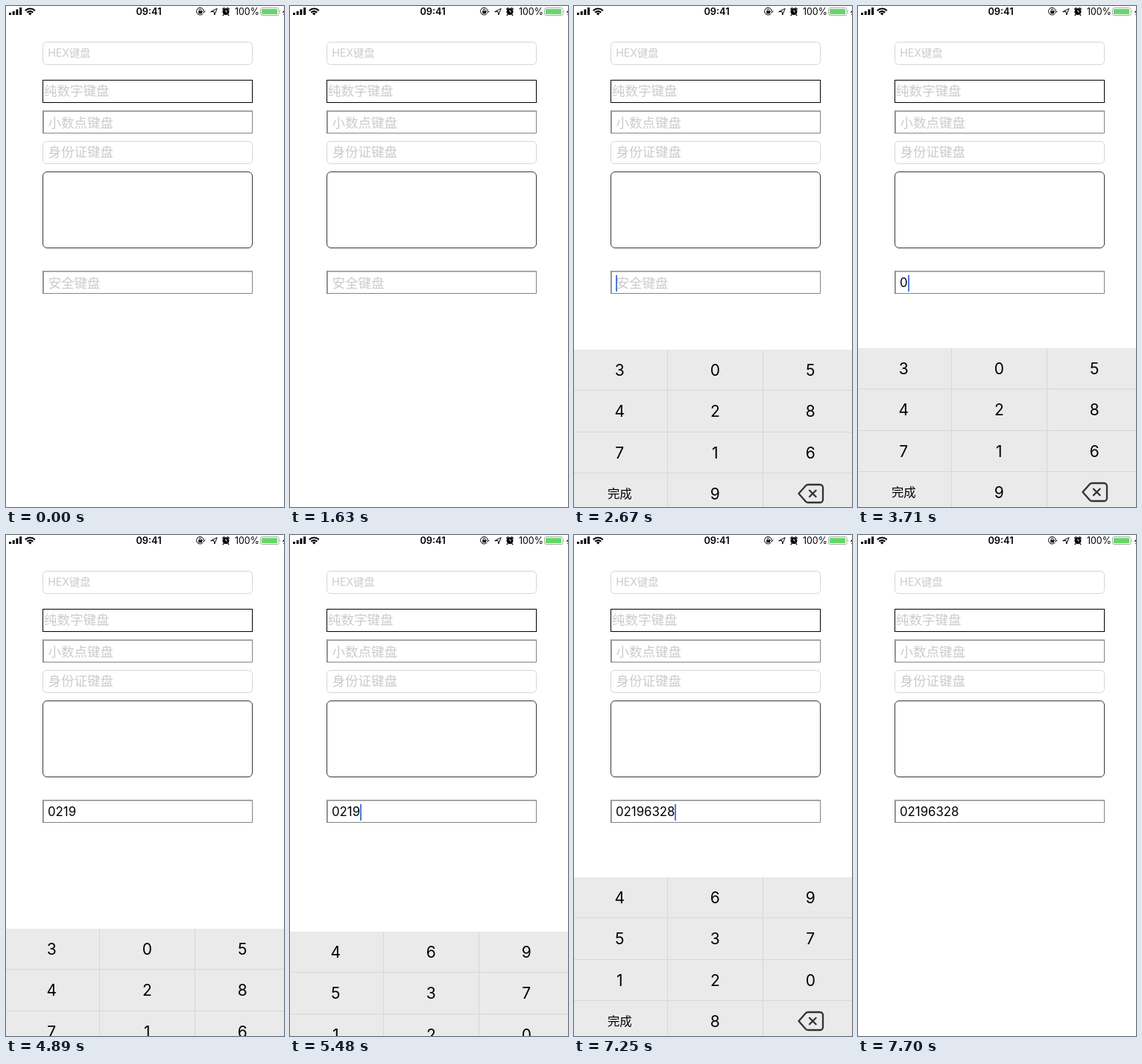
An HTML page that plays this animation: 373 px wide and 672 px high, repeating every 7990 ms.

```html
<!DOCTYPE html>
<html lang="zh-CN">
<head>
<meta charset="utf-8">
<title>数字键盘</title>
<style>
html, body { margin: 0; width: 100%; height: 100%; overflow: hidden; background: #fff; }
body { position: relative; font-family: Inter, "Noto Sans CJK SC", "Noto Sans CJK", sans-serif; }
svg { position: absolute; left: 0; top: 0; display: block; }
.hint { fill: #cbcbcd; font-size: 17.5px; }
.round { fill: none; stroke: #d6d6d6; }
.line { fill: none; stroke: #000; stroke-linecap: round; stroke-linejoin: round; }
.keys { font-size: 21px; text-anchor: middle; }
.grid { stroke: #d7d7d7; fill: none; }
#entry { position: absolute; left: 56px; top: 360px; height: 23px; font-size: 16.8px; line-height: 23px; white-space: pre; display: flex; }
#caret { width: 2px; height: 22px; margin-top: 1px; background: #5078e0; }
</style>
</head>
<body>
<svg width="373" height="672" viewBox="0 0 373 672">
  <defs>
    <g id="bezel">
      <path d="M50 31V1H331" fill="none" stroke="#a6a6a6" stroke-width="2"/>
      <path d="M50 30.5H330.5V1" fill="none" stroke="#858585"/>
      <path d="M49.5 0V31" stroke="#858585"/>
    </g>
  </defs>

  <!-- status bar -->
  <path d="M4 9h3v3h-3zM8.7 7h3v5h-3zM13.4 4.6h3v7.4h-3zM18.1 2h3v10h-3z"/>
  <g class="line" stroke-width="2.1" style="stroke-linecap:butt">
    <path d="M25.8 6.2a9.2 9.2 0 0 1 13 0M28.3 8.8a5.7 5.7 0 0 1 8 0"/>
  </g>
  <path d="M32.3 12.6l-2.3-2.4a3.3 3.3 0 0 1 4.6 0z"/>
  <text x="191.5" y="12.2" font-size="12.8" font-weight="600" text-anchor="middle">09:41</text>
  <g class="line" stroke-width="1">
    <path d="M264.2 10.4a4.9 4.9 0 1 1 1.2-3.6M263.5 7.2l2 1.7 1.5-2"/>
    <path d="M259.2 7v-1.2a1.4 1.4 0 0 1 2.8 0v1.2"/>
    <path d="M275 7.6l8.2-4.2-3.4 8.6-.7-4.2z"/>
  </g>
  <path d="M258.2 6.8h4.8v3.4h-4.8z"/>
  <circle cx="295" cy="7.6" r="4.5"/>
  <path class="line" stroke-width="1.4" d="M290.7 4.2l2-1.7M299.3 4.2l-2-1.7M292 11.6l-.8 1M298 11.6l.8 1"/>
  <path d="M295 5v2.8h2" fill="none" stroke="#fff" stroke-width=".9"/>
  <text x="307" y="12" font-size="12.4">100%</text>
  <rect x="341.5" y="2.5" width="24.5" height="10" rx="2" fill="#fff" stroke="#a8a8a8"/>
  <rect x="343" y="4" width="21" height="7" rx=".6" fill="#65d768"/>
  <path d="M367 5.6q1.6 1.9 0 3.8z" fill="#a8a8a8"/>
  <path d="M373 6l-2.2 2.8h2.2zM372.3 11h.7v1h-.7z"/>

  <!-- fields -->
  <rect class="round" x="49.5" y="48.5" width="281" height="30" rx="5"/>
  <rect x="49.5" y="99.5" width="281" height="30" fill="none" stroke="#000"/>
  <use href="#bezel" y="140"/>
  <rect class="round" x="49.5" y="181.5" width="281" height="30" rx="5"/>
  <rect x="49.5" y="222.5" width="281" height="102" rx="5.5" fill="none" stroke="#383838"/>
  <use href="#bezel" y="355"/>
  <g class="hint">
    <text x="56.3" y="68.2" style="font-size:14.2px">HEX键盘</text>
    <text x="51" y="120.2">纯数字键盘</text>
    <text x="56.5" y="163">小数点键盘</text>
    <text x="56.5" y="202.2">身份证键盘</text>
    <text x="56.5" y="378" id="hint">安全键盘</text>
  </g>

  <!-- keyboard -->
  <g id="board">
    <rect width="373" height="216" fill="#eaeaea"/>
    <path class="grid" d="M125.5 0V216M253.5 0V216M0 54.5H373M0 110.5H373M0 165.5H373"/>
    <g class="keys" id="keys"></g>
    <text x="61.3" y="199" font-size="16.4" text-anchor="middle">完成</text>
    <g class="line" style="stroke:#333" stroke-width="2.3">
      <path d="M301.5 193l9.3-10.4q1.4-1.6 3.4-1.6H330a4 4 0 0 1 4 4V201a4 4 0 0 1-4 4H314.2q-2 0-3.4-1.6z"/>
      <path d="M316 188.7l8.6 8.6M324.6 188.7l-8.6 8.6"/>
    </g>
  </g>
</svg>
<div id="entry"><span id="typed"></span><i id="caret"></i></div>

<script>
const LOOP = 7990, OPEN = 459, CLOSED = 672;
const FIRST = '3054287169', SECOND = '4695371208';
const $ = id => document.getElementById(id);

// Each step holds until the next one and states only what changes.
const steps = [
  [0, { top: CLOSED, layout: FIRST, typed: '', caret: false }],
  [2370, { top: 589, caret: true }],
  [2520, { top: 477 }],
  [2670, { top: 461 }],
  [2810, { top: OPEN, caret: false }],
  [3110, { caret: true }],
  [3410, { typed: '0' }],
  [3850, { typed: '02' }],
  [4150, { typed: '021' }],
  [4440, { typed: '0219' }],
  [4890, { top: 528, caret: false }],
  [5040, { top: 651 }],
  [5180, { top: CLOSED }],
  [5480, { top: 532, layout: SECOND, caret: true }],
  [5630, { top: 467 }],
  [5780, { top: OPEN }],
  [5920, { caret: false }],
  [6070, { typed: '02196', caret: true }],
  [6370, { typed: '021963' }],
  [6660, { typed: '0219632' }],
  [6950, { typed: '02196328' }],
  [7400, { top: 528, caret: false }],
  [7550, { top: 651 }],
  [7700, { top: CLOSED }]
];

const keys = Array.from({ length: 10 }, (_, i) => {
  const key = document.createElementNS('http://www.w3.org/2000/svg', 'text');
  const col = i < 9 ? i % 3 : 1, row = Math.floor(i / 3);
  key.setAttribute('x', 61.3 + 128 * col);
  key.setAttribute('y', 35 + 55.3 * row);
  return $('keys').appendChild(key);
});

function stateAt(time) {
  const state = {};
  for (const [start, change] of steps) {
    if (start > time) break;
    Object.assign(state, change);
  }
  return state;
}

function draw(now) {
  const { top, layout, typed, caret } = stateAt(now % LOOP);
  $('board').setAttribute('transform', `translate(0 ${top})`);
  keys.forEach((key, i) => { key.textContent = layout[i]; });
  $('typed').textContent = typed;
  $('hint').style.visibility = typed ? 'hidden' : 'visible';
  $('caret').style.visibility = caret ? 'visible' : 'hidden';
}

const begin = performance.now();
function tick() {
  draw(performance.now() - begin);
  requestAnimationFrame(tick);
}
tick();
</script>
</body>
</html>
```
